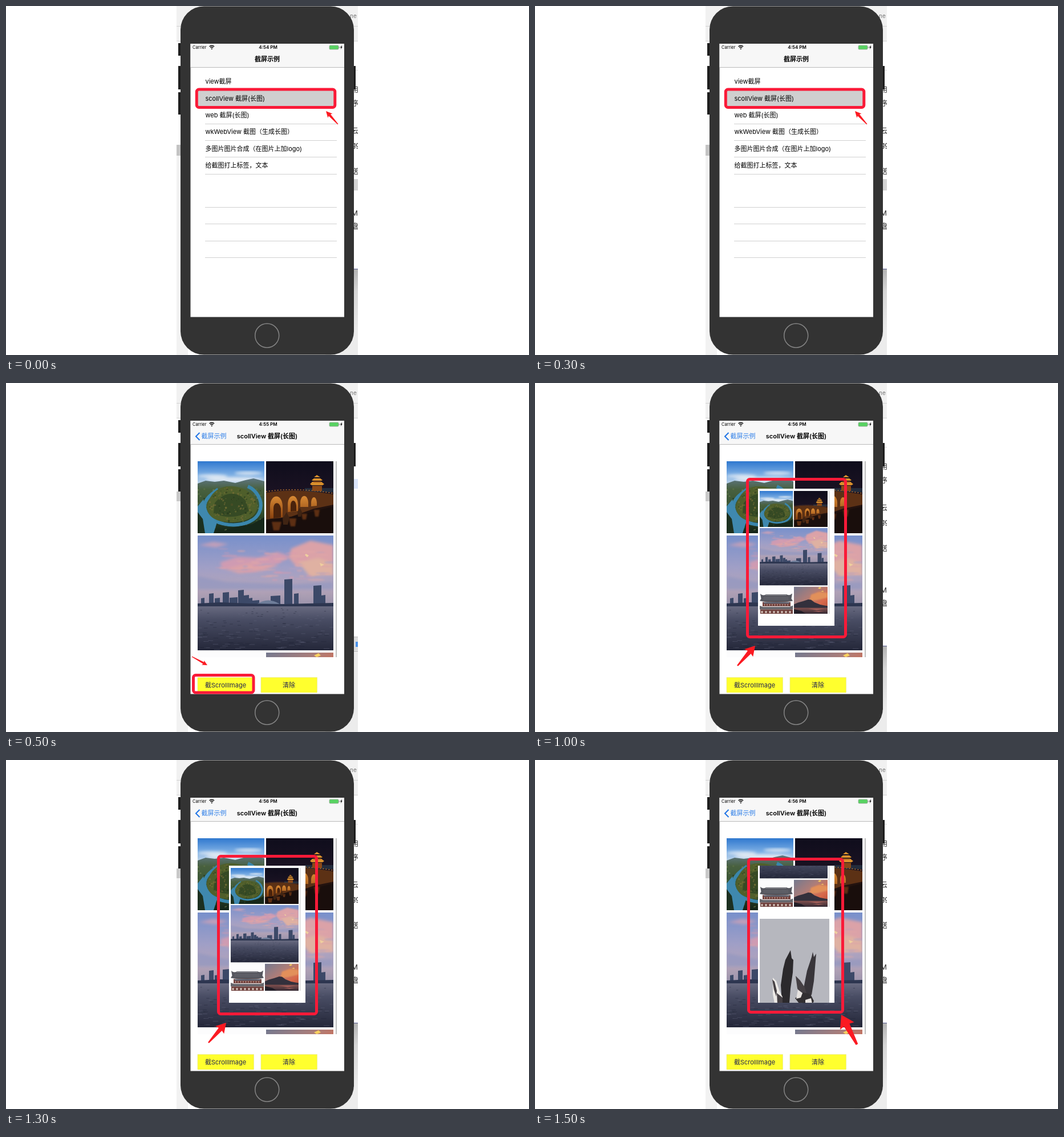
These frames come from a looping animation (917 px wide and 611 px high, 2000 ms). An HTML page:

```html
<!DOCTYPE html>
<html lang="zh">
<head>
<meta charset="utf-8">
<title>截屏示例</title>
<style>
html, body { margin: 0; width: 100%; height: 100%; overflow: hidden; background: #fff; }
svg { display: block; font: 11px Inter, "Noto Sans CJK SC", "Noto Sans CJK", sans-serif; }
.mid { text-anchor: middle; }
.bold { font-weight: 600; }
.red { fill: none; stroke: #fa1a38; stroke-width: 5; }
[data-on] { visibility: hidden; }
[data-on].show { visibility: visible; }
</style>
</head>
<body>
<svg width="917" height="611" viewBox="0 0 917 611">
<defs>
  <linearGradient id="shade" x2="0" y2="1">
    <stop stop-color="#b4b4b4"/><stop offset=".35" stop-color="#d6d6d6"/><stop offset="1" stop-color="#ececec"/>
  </linearGradient>
  <linearGradient id="day" x2="0" y2="1">
    <stop stop-color="#2f78cf"/><stop offset=".55" stop-color="#7fb0e4"/><stop offset="1" stop-color="#d3e0ea"/>
  </linearGradient>
  <linearGradient id="land" x2="0" y2="1">
    <stop stop-color="#5d7580"/><stop offset=".2" stop-color="#48603f"/><stop offset=".6" stop-color="#34502f"/><stop offset="1" stop-color="#142417"/>
  </linearGradient>
  <linearGradient id="night" x2="0" y2="1">
    <stop stop-color="#0f0d1c"/><stop offset=".4" stop-color="#1a1222"/><stop offset=".6" stop-color="#24130f"/><stop offset="1" stop-color="#170c0a"/>
  </linearGradient>
  <linearGradient id="dusk" x2="0" y2="1">
    <stop stop-color="#7890cb"/><stop offset=".45" stop-color="#a09fc6"/><stop offset=".75" stop-color="#b5a4b8"/><stop offset="1" stop-color="#9892aa"/>
  </linearGradient>
  <linearGradient id="sea" x2="0" y2="1">
    <stop stop-color="#686a80"/><stop offset=".3" stop-color="#494d64"/><stop offset="1" stop-color="#242739"/>
  </linearGradient>
  <linearGradient id="sunset" x2="1" y2="1">
    <stop stop-color="#74798f"/><stop offset=".4" stop-color="#ae7d78"/><stop offset=".7" stop-color="#d9694a"/><stop offset="1" stop-color="#a54a3c"/>
  </linearGradient>
  <linearGradient id="lake" x2="0" y2="1">
    <stop stop-color="#8a5450"/><stop offset="1" stop-color="#352a34"/>
  </linearGradient>
  <linearGradient id="glow" x2="0" y2="1">
    <stop stop-color="#d88a34"/><stop offset="1" stop-color="#8a420f"/>
  </linearGradient>
  <filter id="soft"><feGaussianBlur stdDeviation="2.500"/></filter>
  <filter id="haze"><feGaussianBlur stdDeviation="1"/></filter>
  <clipPath id="strip"><path d="M299 0h318v611H299z"/></clipPath>
  <clipPath id="view"><path d="M323 137h270v343H323z"/></clipPath>
  <clipPath id="popup"><path d="M391 185h134v240H391z"/></clipPath>
  <clipPath id="c1"><path d="M336 137h117v126H336z"/></clipPath>
  <clipPath id="c2"><path d="M456 137h118v126H456z"/></clipPath>
  <clipPath id="c3"><path d="M336 267h238v201H336z"/></clipPath>
  <clipPath id="c4"><path d="M336 472h117v95H336z"/></clipPath>
  <clipPath id="c5"><path d="M456 472h118v95H456z"/></clipPath>

  <g id="photos">
    <g clip-path="url(#c1)">
      <path fill="url(#day)" d="M336 137h117v44H336z"/>
      <g fill="#eef2f6" filter="url(#soft)" opacity=".8">
        <ellipse cx="362" cy="163" rx="26" ry="3"/><ellipse cx="425" cy="158" rx="24" ry="3"/><ellipse cx="400" cy="169" rx="50" ry="4"/>
      </g>
      <path fill="url(#land)" d="M336 176l14-5 16 2 16-2 20 4 18-5 14-3 19 5v91H336z"/>
      <g id="woods"></g>
      <path fill="none" stroke="#3a86ac" stroke-width="6" d="M424 181C440 188 450 206 446 221C440 244 412 250 390 248C364 245 349 231 348 217C348 203 360 195 372 186"/>
      <path fill="#3f88ae" d="M336 216l10-12 8 24 16 16-6 19h-28z"/>
      <path fill="#1c3020" d="M336 226l9 12 4 25h-13z"/>
      <path fill="#4f5f2b" d="M352 217c6-27 24-38 46-36 26 2 42 18 43 35-2 19-20 28-46 28-25 0-42-9-43-27z"/>
      <path fill="#364a24" d="M366 210c16-20 40-22 54-4l6 18c-20 14-44 12-62 4z"/>
      <path fill="#16271a" d="M374 263l22-10 36-6 21-12v28z"/>
      <g id="leaves"></g>
    </g>
    <g clip-path="url(#c2)">
      <path fill="url(#night)" d="M456 137h118v126H456z"/>
      <path fill="#232c3c" d="M524 184h50v7h-50z"/>
      <path fill="#5c3115" d="M456 192q50-9 118 3v18l-34 7-40 14-44 5z"/>
      <path fill="none" stroke="#b8702c" stroke-width="1.500" stroke-dasharray="2 3" d="M456 190q50-8 118 3"/>
      <path fill="url(#glow)" d="M463 237v-22c1-22 21-22 22 0v20zM494 226v-14c1-19 17-19 18 0v12zM516 217v-8c1-15 13-15 14 0v8zM535 216v-7c1-12 9-12 10 0v6z"/>
      <path fill="#4a230c" d="M469 237v-17c0-13 11-13 13 0v15zM499 225v-10c0-12 9-12 10 0v9z"/>
      <path fill="#d9902d" d="M533 177l4-4h16l5 4-3 2h-19zM536 170l4-3h11l4 3-2 1h-15zM540 165l5-4 6 4z"/>
      <path fill="#8a4918" d="M537 180h17v9h-17zM539 172h13v2h-13z"/>
      <path fill="#190e0c" d="M456 243l48-9 70-18v47H456z"/>
      <g fill="#7a3d18" opacity=".7" filter="url(#haze)"><path d="M466 243h17l-4 15h-10zM496 237h13l-2 14h-8zM518 229h10l-2 10h-6zM540 222h10l-2 12h-6z"/></g>
      <path fill="#402413" d="M485 237l7-11 5 10-3 12h-8zM511 226l4-8 4 8-2 8h-5z"/>
    </g>
    <g clip-path="url(#c3)">
      <path fill="url(#dusk)" d="M336 267h238v125H336z"/>
      <g filter="url(#soft)">
        <path fill="#cf9bb2" d="M376 314l30-10 36 2 34-10 24 8-24 12-36 6-26 8-36-6z"/>
        <path fill="#dba2a8" d="M384 325l44-10 50 4-30 10-40 4zM500 290l34-14 40 8v34l-40-2-24 6-14-16z"/>
        <path fill="#dfb1a2" d="M512 314l36-8 26 10v20l-40 4z"/>
        <path fill="#9198c0" d="M336 338l50 10 60 2 60 2 68-4v14H336z" opacity=".7"/>
        <path fill="#bf9fba" d="M338 284l26-6 26 4-22 6z"/>
      </g>
      <g id="clouds" filter="url(#haze)"></g>
      <path fill="#efcf9e" d="M526 299l5 3-3 3-4-4zM550 315l8 3-6 3z"/>
      <g id="skyline" fill="#3c4968"></g>
      <path fill="#6f7e9a" d="M440 387q20-13 40 0z"/>
      <path fill="#2d3650" d="M336 386l40-2 50 2 60 1 88-2v6H336z"/>
      <path fill="url(#sea)" d="M336 391h238v77H336z"/>
      <g id="waves"></g>
    </g>
    <g clip-path="url(#c4)">
      <path fill="#fcfcfd" d="M336 472h117v95H336z"/>
      <path fill="#55565e" d="M338 497q10 9 20 2h72q10 6 20-3l-3 18 5 8q-22 5-58 5t-58-5l5-8z"/>
      <path fill="#8b8c92" d="M356 500h74v3h-74z"/>
      <path fill="none" stroke="#74757c" stroke-width="12" stroke-dasharray="1 3" d="M350 513h88"/>
      <path fill="#76443f" d="M346 526h98v15h-98z"/>
      <path fill="#59687a" d="M350 527h90v4h-90z"/>
      <path fill="none" stroke="#c3b4ac" stroke-width="6" stroke-dasharray="2 7" d="M352 536h88"/>
      <path fill="#66666c" d="M336 539l12 4h92l13-5v14H336z"/>
      <path fill="#70413d" d="M338 552h114v15H338z"/>
      <path fill="none" stroke="#d9cbc2" stroke-width="7" stroke-dasharray="6 8" d="M341 561h110"/>
    </g>
    <g clip-path="url(#c5)">
      <path fill="url(#sunset)" d="M456 472h118v95H456z"/>
      <path fill="#e2905a" filter="url(#soft)" d="M516 500l28-10 30 4v16l-40 10-24 2z"/>
      <path fill="#f6cf60" d="M540 477l8-4 4 4-7 3zM550 489l8-3 2 4z"/>
      <path fill="url(#lake)" d="M456 544h118v23H456z"/>
      <path fill="#33303c" d="M456 534l14-6 18-5 18-6 10 1 12 9 20 8 26 5v6H456z"/>
      <path fill="#a8605a" filter="url(#haze)" d="M506 549h60l-30 5zM522 557h40l-20 3z"/>
      <path fill="#231f28" d="M456 551l26 6 16 10h-42z"/>
    </g>
    <path stroke="#aaa" stroke-width="1.500" d="M579 137v430"/>
  </g>
</defs>

<g clip-path="url(#strip)">
  <path fill="#f1f1f1" d="M299 0h318v62H299z"/>
  <path stroke="#d2d2d2" d="M299 35.500h318M299 61.500h318"/>
  <text x="603" y="21" font-size="10" fill="#777">ne</text>
  <path fill="#f2f2f2" d="M299 207h20v404h-20z"/>
  <path fill="#ececec" d="M560 472h57v139h-57z"/>
  <path data-on="0" fill="#fff" d="M299 190h8v53h-8z"/>
  <path data-on="0" fill="#c4c4c4" d="M299 243h8v19h-8z"/>
  <path data-on="123" fill="#c9c9c9" d="M299 190h8v17h-8z"/>
  <g data-on="023">
    <path stroke="#ddd" d="M605 112.500h12"/>
    <g id="notes" font-size="12" fill="#222"></g>
    <path fill="url(#shade)" d="M590 461h27v110h-27z"/>
    <path stroke="#555a90" d="M605 460.500h12"/>
  </g>
  <path data-on="0" fill="#d4d4d4" d="M605 303h12v20h-12z"/>
  <g data-on="1">
    <path fill="#dbe6fa" d="M605 168h12v17h-12z"/>
    <path fill="#dcdcdc" stroke="#bbb" d="M605 444.500h14v26h-14z"/>
    <path fill="#4b93ea" d="M613 453h4v9h-4z"/>
  </g>
</g>

<path fill="#1d1d1d" d="M302 65h6v22h-6zM302 105h6v41h-6zM302 151h6v39h-6zM608 105h5v41h-5z"/>
<rect x="306" y="0.500" width="304" height="610" rx="41" fill="#333"/>
<circle cx="457.700" cy="577" r="21" fill="none" stroke="#858585" stroke-width="1.500"/>
<path fill="#fff" d="M323.500 66h269.500v478.500H323.500z"/>
<path fill="#f7f7f7" d="M323.500 66h269.500v41H323.500z"/>
<path stroke="#b9b9b9" d="M323.500 107.500h269.500"/>

<g font-size="7.500">
  <text x="327" y="75">Carrier</text>
  <text id="clock" class="mid bold" x="459.500" y="75.200" font-size="8"></text>
</g>
<path fill="none" stroke="#000" stroke-width="1.400" d="M356.500 71q4.300-3.600 8.600 0M358.300 73q2.500-2 5 0"/>
<circle cx="360.800" cy="75" r="1"/>
<rect x="567" y="69" width="16" height="7" rx="1.500" fill="#58d362" stroke="#9aa59a" stroke-width=".8"/>
<path fill="#888" d="M583.700 71h1v3h-1z"/>
<path d="M589 68.500l-3 4.200h1.600l-.8 3.300 3-4.400h-1.600z"/>

<g data-on="0">
  <text class="mid bold" x="458" y="97">截屏示例</text>
  <path fill="#cfcfcf" d="M334 147h243v29H334z"/>
  <rect class="red" x="334.300" y="146" width="242.500" height="31.500" rx="4"/>
  <g id="rows"></g>
</g>

<g data-on="123">
  <path fill="none" stroke="#1f74e6" stroke-width="2" d="M339.500 87l-6.500 6.500 6.500 6.500"/>
  <text x="342.500" y="97" fill="#2f7fe8">截屏示例</text>
  <text class="mid bold" x="458" y="97">scollView 截屏(长图)</text>
  <use href="#photos" clip-path="url(#view)"/>
  <path fill="#ffff2e" stroke="#e4e48c" stroke-width=".6" d="M336 515.500h98.500v26.500H336zM447 515.500h98.500v26.500H447z"/>
  <g class="mid" fill="#26264f">
    <text x="385" y="532.500">截ScrollImage</text><text x="496" y="532.500">清除</text>
  </g>
</g>

<rect data-on="1" class="red" x="328.500" y="511.500" width="105.500" height="30.500" rx="4"/>

<path data-on="23" fill="#fff" d="M391 185h134v240H391z"/>
<g data-on="2">
  <g clip-path="url(#popup)"><use href="#photos" transform="translate(226 120.500) scale(.5)"/></g>
  <rect class="red" x="372.500" y="168.500" width="172" height="276" rx="4"/>
</g>
<g data-on="3">
  <g clip-path="url(#popup)">
    <use href="#photos" transform="translate(226 -26.500) scale(.5)"/>
    <path fill="#b6b7be" d="M394 278h122v148H394z"/>
    <path fill="#2b292c" d="M448 333l2 14 3 3-1 22-4 28-2 26h-13l-2-32 4-28 4-16z"/>
    <path fill="#ece9e6" d="M417 381l6 6 6 18 5 10v11h-14l-3-16z"/>
    <path fill="#454044" d="M416 384l4 4 4 16-1 10-4-12zM424 408l10 8v10h-9z"/>
    <path fill="#38353a" d="M487 336l2 9 4-6-2 24-2 24-4 24-12 6-2-18 6-30 8-24z"/>
    <path fill="#454044" d="M457 378l8 8 8 12 4 14-9 2-8-14z"/>
    <path fill="#322f32" d="M456 417l14-10 13 3 6 12-2 4h-24z"/>
    <path fill="#e6e2df" d="M461 402l8 6-3 8-8 2zM474 420l10-3 2 9h-12z"/>
  </g>
  <rect class="red" x="374.500" y="173.500" width="165" height="268" rx="4"/>
</g>
<g id="arrows" fill="#fb1a22"></g>
</svg>

<script>
const $ = id => document.getElementById(id);
const fill = (id, items, draw) => { $(id).innerHTML = items.map(draw).join(''); };
const scatter = (id, count, draw) => fill(id, Array(count).fill(0), draw);

let seed = 7;
const rnd = (lo, hi) => {
  seed = seed * 16807 % 2147483647;
  return +(lo + (hi - lo) * seed / 2147483647).toFixed(1);
};
const pick = list => list[Math.floor(rnd(0, list.length - .1))];

fill('rows', ['view截屏', 'scollView 截屏(长图)', 'web 截屏(长图)', 'wkWebView 截图（生成长图）',
  '多图片图片合成（在图片上加logo)', '给截图打上标签，文本', '', '', '', '', ''], (label, i) => {
  const y = 136.3 + i * 29.3;
  const lineY = Math.round(147 + i * 29.3) + .5;
  const line = i > 1 && i !== 6 ? `<path stroke="#d0d0d0" d="M349 ${lineY}H580"/>` : '';
  return `<text x="349.500" y="${y}">${label}</text>${line}`;
});

fill('notes', [['用', 151], ['序', 175], ['云', 223], ['gg', 247], ['送', 294], ['M', 367], ['盘', 390]],
  ([s, y]) => `<text x="606" y="${y}">${s}</text>`);

fill('skyline', [[342, 376, 6], [356, 368, 8], [366, 376, 9], [380, 366, 11], [392, 375, 14], [407, 362, 10],
  [417, 371, 9], [426, 376, 6], [432, 380, 12], [464, 372, 17], [488, 343, 14], [505, 368, 8], [539, 354, 14], [553, 371, 7]],
  ([x, y, w]) => `<path d="M${x} 390V${y + 1}l${w} -1V390z"/>`);

scatter('clouds', 60, () => {
  const x = rnd(380, 570);
  return `<ellipse cx="${x}" cy="${rnd(290, 345)}" rx="${rnd(4, 16)}" ry="${rnd(.8, 2.4)}"
    fill="${pick(['#d99aac', '#e3a9a6', '#a6a0c6'])}" opacity=".45"/>`;
});

scatter('waves', 170, () => {
  const y = rnd(394, 467), w = 2 + (y - 390) / 9;
  return `<path stroke="${pick(['#1d2133', '#666981'])}" opacity=".4" d="M${rnd(334, 572)} ${y}h${w}"/>`;
});

const leaf = (x, y, tones) => `<circle cx="${x}" cy="${y}" r="${rnd(.6, 1.9)}" fill="${pick(tones)}" opacity=".6"/>`;
scatter('woods', 130, () => leaf(rnd(336, 453), rnd(184, 262), ['#1c301d', '#5f7448', '#7b8a5c']));
scatter('leaves', 150, () => {
  const a = rnd(0, 6.28), r = Math.sqrt(rnd(0, 1));
  return leaf(396 + 41 * r * Math.cos(a), 213 + 29 * r * Math.sin(a), ['#26391c', '#6f7034', '#7d6e38']);
});

// tip, tail, head length, head half width, shaft half widths at head and tail
fill('arrows', [
  [0, 561, 184, 582, 207, 11, 5.5, 2.2, .6],
  [1, 353, 494, 326, 479, 9, 4.5, 1.7, .5],
  [2, 386, 460, 355, 495, 17, 10, 3.8, 1.2],
  [3, 537, 446, 564.5, 498, 22, 14, 5.5, 2]
], ([on, x, y, tx, ty, head, hw, sw, tw]) => {
  const len = Math.hypot(tx - x, ty - y);
  const deg = Math.atan2(ty - y, tx - x) * 180 / Math.PI;
  const neck = head - 1.5;
  return `<path data-on="${on}" transform="translate(${x} ${y}) rotate(${deg})"
    d="M0 0L${head} ${-hw}L${neck} ${-sw}L${len} ${-tw}V${tw}L${neck} ${sw}L${head} ${hw}z"/>`;
});

const clocks = ['4:54 PM', '4:55 PM', '4:56 PM', '4:56 PM'];
const parts = [...document.querySelectorAll('[data-on]')];
let shown = -1;

function tick() {
  const step = Math.floor(performance.now() % 2000 / 500);
  if (step !== shown) {
    shown = step;
    $('clock').textContent = clocks[step];
    parts.forEach(p => p.classList.toggle('show', p.dataset.on.includes(step)));
  }
  requestAnimationFrame(tick);
}
tick();
</script>
</body>
</html>
```
